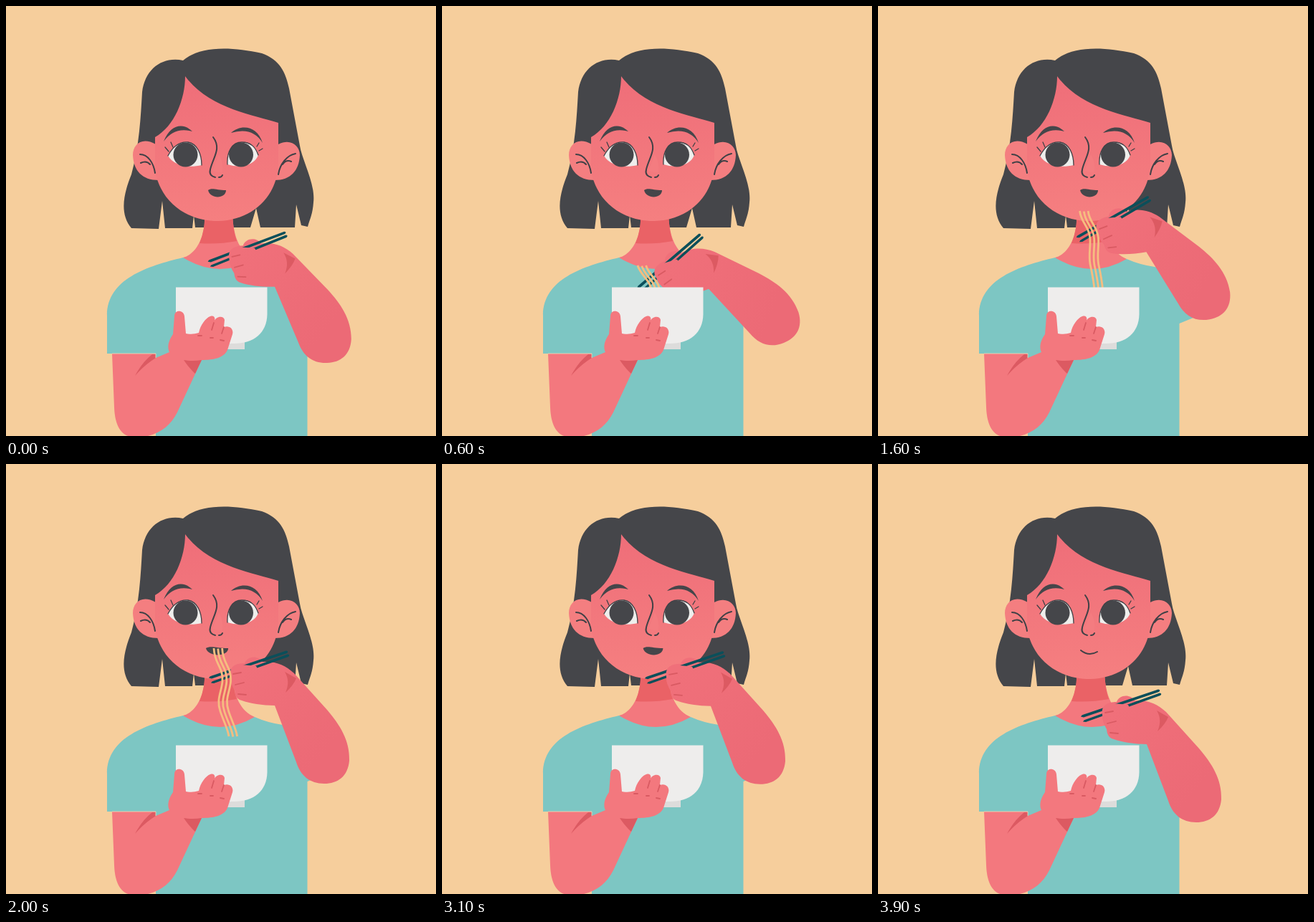
An HTML page for the animation above (4 s loop, 600 px wide and 600 px high).

```html
<!DOCTYPE html>
<html lang="en">
<head>
<meta charset="utf-8">
<title>Eating noodles</title>
<style>
  html, body { margin: 0; width: 100%; height: 100%; overflow: hidden; background: #f6ce9c; }
  svg { display: block; width: 100vw; height: 100vh; }
  .hair { fill: #45464a; }
  .skin { fill: url(#skin); }
  .limb { fill: #f3787e; }
  .arm { fill: url(#armTone); }
  .shade { fill: #dc5a62; }
  .shirt { fill: #7dc6c3; }
  .line { fill: none; stroke: #404146; stroke-width: 2; stroke-linecap: round; }
  .thin { stroke-width: 1.3; }
  .crease { fill: none; stroke: #d95a62; stroke-width: 1.8; stroke-linecap: round; }
  .stick { fill: #0b4f5a; }
  .noodle { fill: none; stroke: #f6bd80; stroke-width: 2.8; }
</style>
</head>
<body>
<svg viewBox="0 0 600 600">
  <defs>
    <linearGradient id="skin" gradientUnits="userSpaceOnUse" x1="0" y1="100" x2="0" y2="300">
      <stop offset="0" stop-color="#ef6e79"/><stop offset="1" stop-color="#f57f80"/>
    </linearGradient>
    <linearGradient id="armTone" gradientUnits="userSpaceOnUse" x1="320" y1="350" x2="440" y2="460">
      <stop offset="0" stop-color="#f0707a"/><stop offset="1" stop-color="#ec6a76"/>
    </linearGradient>
    <filter id="blur" filterUnits="userSpaceOnUse" x="200" y="200" width="400" height="400">
      <feGaussianBlur id="blurAmount" stdDeviation="0"/>
    </filter>
  </defs>

  <path class="hair" d="M175 310C158 290 164 262 175 235C186 195 188 155 190 120C194 88 218 70 247 76C270 56 312 56 357 66C382 75 390 92 395 115L410 195C413 215 432 248 429 274C428 290 424 297 421 308L412 306L405 277L403 309H355L349 282L341 309H264L262 292L260 310H222L218 272L213 311Z"/>

  <path class="limb" d="M278 290C278 322 266 346 247 351C255 380 340 380 347 353C328 345 317 325 316 290Z"/>
  <path fill="#ea6266" d="M277 290H316Q317 315 322 328Q295 333 270 331Q278 312 277 290Z"/>
  <path class="shirt" d="M247 351C197 363 141 381 141 432V485H209V600H420.500V443L440 435C425 400 412 369 386 364Q365 361 347 353Q297 382 247 351Z"/>

  <path fill="#f47e80" d="M209 193C190 182 177 193 177 208C178 230 190 243 213 243ZM380 193C397 184 410 195 410 208C409 230 397 243 375 243Z"/>
  <path class="skin" d="M250 98C250 130 235 168 208 183V230C216 274 252 300 296 300C345 299 380 264 380 218V163C345 152 283 143 250 98Z"/>
  <path class="line" d="M187 207C198 207 206 219 208 233M188 219Q196 215 201 221M404 206C392 208 382 221 380 235M398 217Q391 214 386 221"/>
  <path class="hair" d="M220 189C230 164 248 163 260 175Q235 168 220 189ZM314 177C328 164 351 167 358 191Q344 168 314 177Z"/>
  <path class="line thin" d="M227 203L222 197M233 197L230 190M350 196L353 191M353 202L358 199"/>
  <path fill="#eeeeec" d="M226 209C234 194 244 189 254 190C267 192 273 207 273 222C256 226 235 224 226 209ZM309 221C308 204 315 190 329 190C342 190 348 197 352 208C347 222 328 227 309 221Z"/>
  <circle class="hair" cx="250.500" cy="207.500" r="17"/>
  <circle class="hair" cx="328" cy="207.500" r="17"/>
  <path class="line thin" d="M226 209C234 194 244 189 254 190C267 192 273 207 273 222M309 221C308 204 315 190 329 190C342 190 348 197 352 208"/>
  <path fill="#f47c80" d="M297 207Q304 220 302 233L288 230Z"/>
  <path class="line" d="M289 183C301 199 289 211 285 228C283 236 288 238 292 239M297 239Q301 239 302 236"/>
  <path id="mouth" class="hair" d="M282 257C287 253 294 257 307 257C307 269 285 270 282 257Z"/>
  <path id="smile" class="line" d="M283 260Q294 269 306 262"/>

  <g id="armLayer">
    <g id="arm">
      <path class="arm" d="M313 350C311 336 321 332 333 332C336 322 352 320 358 330C378 329 390 335 402 346L448 397C466 418 480 440 479 468C477 490 463 500 444 500C424 500 411 489 405 470L375 391C358 391 340 388 329 384C320 382 319 374 319 366C314 362 313 356 313 350Z"/>
      <path class="shade" d="M389 344L405 353Q401 363 390 373Q397 357 389 344Z"/>
      <path class="stick" d="M283 352.500Q284 350 287 349.500L391 314.500Q395 315 392 318L287 353.500ZM286 359.500Q287 357 290 356.500L393 319.500Q397 320 394 323L290 360Z"/>
      <path class="arm" d="M313 350C311 338 318 333 329 334L349 336C353 341 347 348 342 351L340 372L319 370Q313 360 313 350Z"/>
      <path class="crease" d="M317 347L328 345M320 362L332 359M324 375L335 376"/>
    </g>
  </g>
  <g id="noodles">
    <path class="noodle" pathLength="1"/>
    <path class="noodle" pathLength="1" transform="translate(5.8 .6)"/>
    <path class="noodle" pathLength="1" transform="translate(11.6 0)"/>
  </g>

  <path fill="#dddcdb" d="M262 462H333V479H262Z"/>
  <path fill="#eeedec" d="M237 392.500H364.500V430C364 456 346 471 318 471H284C256 471 237 456 237 430Z"/>

  <path class="limb" d="M235 433C235 423 248 424 249 433L251 457Q260 459 269 456C271 445 279 435 285 433C291 431 293 436 290 441C293 432 304 432 305 438L304 448C312 445 318 451 316 458L309 480C304 491 290 494 273 494L239 567C228 589 208 602 180 602C160 601 152 585 151 560L148 485H209V491L228 483C224 475 228 465 233 458Z"/>
  <path class="shade" d="M209 486V491Q193 501 180 516Q190 497 204 486ZM248 494Q260 496 273 494L264 513Q256 506 248 494Z"/>
  <path class="crease" d="M268 460L273 460M285 463L289 463M299 466L304 467M290 442L287 452M304 448L301 457"/>
  <path fill="none" stroke="#f6d9b4" stroke-width=".8" d="M148 485H209V491"/>
</svg>
<script>
const LOOP = 4000;
const find = id => document.getElementById(id);
const strands = document.querySelectorAll('.noodle');

// Noodle control points relative to the middle of the chopsticks
const lifted = [-46,4, -43,14, -35,20, -30,29, -25,38, -25,50, -26,64, -26,72, -26,87, -26,102];
const eaten = [-49.5,-26, -48.5,-3, -36.5,-1, -37.5,20, -38.5,35, -46.5,45, -40.5,62, -35.5,77, -30.5,85, -28.5,97];

function progress(t, from, to) {
  return Math.min(1, Math.max(0, (t - from) / (to - from)));
}
function ease(t, from, to) {
  return (1 - Math.cos(Math.PI * progress(t, from, to))) / 2;
}
function show(element, visible) {
  element.style.display = visible ? '' : 'none';
}

function draw(t) {
  const dip = ease(t, -100, 400) + ease(t, 3900, 4400);
  const tilt = dip - ease(t, 1200, 2000);
  const x = 339.5 - 20.5 * tilt;
  const y = 337 + 21 * dip - 75 * ease(t, 600, 2000) + 54 * ease(t, 3050, 3700);
  find('arm').setAttribute('transform',
    `translate(${x} ${y}) rotate(${-22 * tilt}) translate(-339.5 -337)`);

  const blur = 1.4 * Math.sin(Math.PI * progress(t, 3050, 3700));
  find('blurAmount').setAttribute('stdDeviation', `0.2 ${blur}`);
  find('armLayer').setAttribute('filter', blur > 0.1 ? 'url(#blur)' : 'none');

  const points = lifted.map((v, i) => v * tilt + eaten[i] * (1 - tilt));
  const path = `M${points.slice(0, 2)}C${points.slice(2)}`;
  const left = 1 - ease(t, 2650, 3050);
  for (const strand of strands) {
    strand.setAttribute('d', path);
    strand.setAttribute('stroke-dasharray', `${left} 2`);
  }
  find('noodles').setAttribute('transform', `translate(${x} ${y})`);
  show(find('noodles'), t >= 280 && t < 3050);

  const chewing = t >= 1800 && t < 3200;
  const width = chewing ? 1.11 + 0.14 * Math.cos((t - 2000) / 200 * Math.PI) : 1;
  find('mouth').setAttribute('transform', `translate(294.5 0) scale(${width} 1) translate(-294.5 0)`);
  const smiling = t >= 3650;
  show(find('mouth'), !smiling);
  show(find('smile'), smiling);
}

function tick() {
  draw(performance.now() % LOOP);
  requestAnimationFrame(tick);
}
tick();
</script>
</body>
</html>
```
